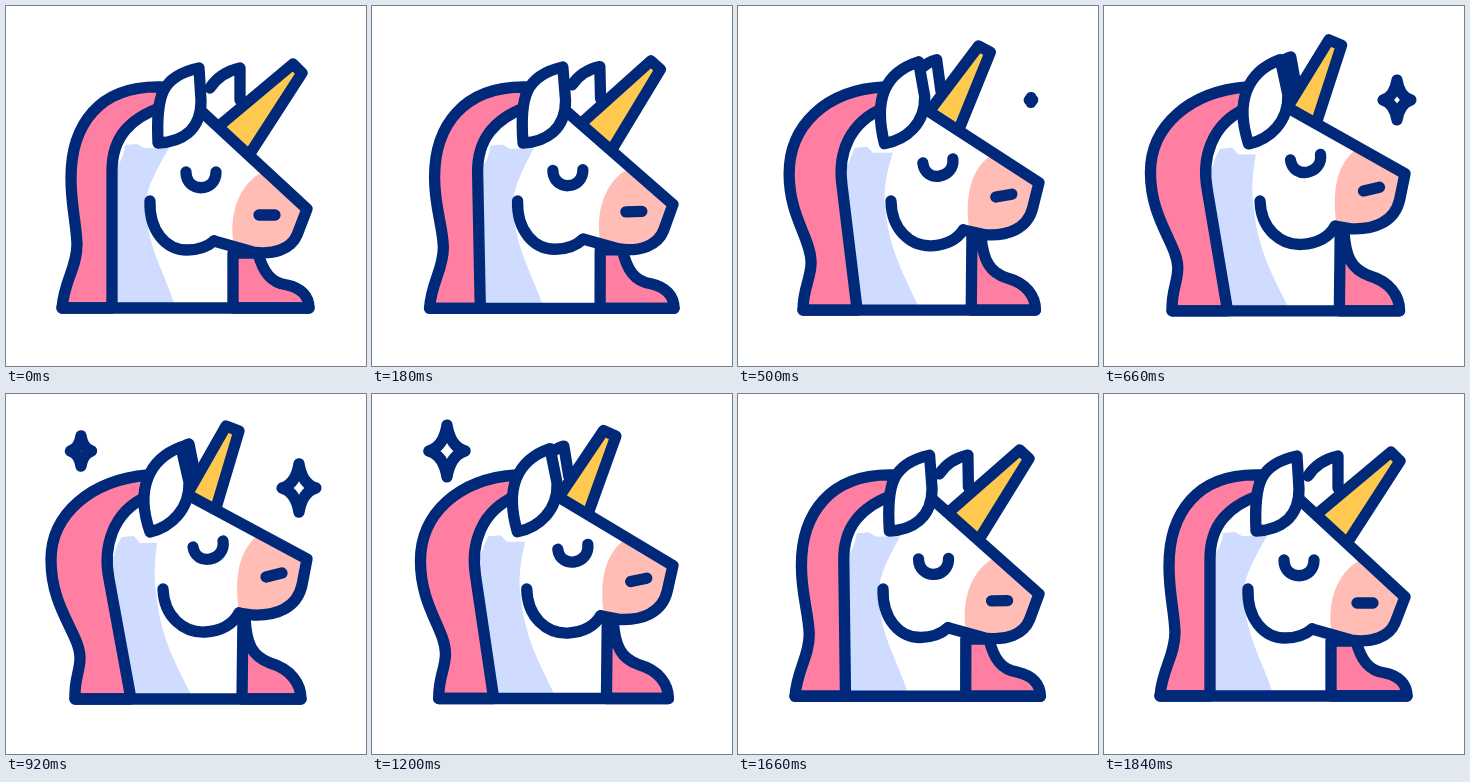
Write an HTML page that moves like this. It is 360 px wide and 360 px high and loops after 2.4 s.

```html
<!DOCTYPE html>
<html lang="en">
<head>
<meta charset="utf-8">
<title>Unicorn</title>
<style>
  html, body { margin: 0; height: 100%; overflow: hidden; background: #fff; }
  svg { display: block; width: 100vw; height: 100vh; }
  path { fill: none; stroke: #00297a; stroke-width: 11.3; stroke-linecap: round; stroke-linejoin: round; }
  .bare { stroke: none; }
</style>
</head>
<body>
<svg id="stage" viewBox="0 0 360 360"></svg>
<script>
const LOOP = 2400;
const stage = document.getElementById('stage');
const pink = '#ff7fa2', blush = '#ffbdb6', shade = '#d0dcff', gold = '#ffc94f';

function addPath(fill = 'none', className = '') {
  const path = document.createElementNS('http://www.w3.org/2000/svg', 'path');
  path.style.fill = fill;
  path.setAttribute('class', className);
  return stage.appendChild(path);
}

// Each part has a resting and a raised outline with matching points.
const parts = [
  { name: 'shade', fill: shade, bare: true,
    rest: 'M106 300 L106 166 C114 158 118 150 119 139 L131 138 L138 142 L163 142 C150 165 138 185 140 205 C143 245 158 265 169 300 Z',
    raised: 'M125 303 L103 175 C108 165 109 152 116 143 L128 142 L134 149 L151 149 C149 165 147 185 151 205 C155 245 172 275 186 302 Z' },
  { name: 'muzzle', fill: blush, bare: true,
    rest: 'M258 165 C232 178 222 210 228 241 L247 246 C268 249 285 243 291 229 L301 203 Z',
    raised: 'M254 140 C232 155 228 185 233 218 L247 221 C270 222 291 214 296 191 L301 165 Z' },
  { name: 'mane', fill: pink,
    rest: 'M56 302 C58 275 71 262 71 238 C70 215 65 200 65 172 C65 120 92 79 156 81 L156 101 C125 112 106 130 106 165 L106 302 Z',
    raised: 'M69 305 C68 285 74 278 74 264 C74 240 45 215 45 166 C45 120 85 86 142 81 L142 102 C105 118 97 155 103 185 L125 305 Z' },
  { name: 'lock', fill: pink,
    rest: 'M227 302 L227 247 L252 247 C257 266 265 277 281 279 C295 282 303 290 303 302 Z',
    raised: 'M236 305 L237 221 L239 222 C240 250 246 262 264 269 C285 275 295 290 295 305 Z' },
  { name: 'base',
    rest: 'M56 302 L303 302',
    raised: 'M69 305 L295 305' },
  { name: 'back ear', fill: '#fff',
    rest: 'M204 82 C211 71 221 65 234 62 L234 94',
    raised: 'M172 56 C176 53 179 51 183 50 L189 80' },
  { name: 'horn', fill: gold,
    rest: 'M213 120 L287 58 L296 67 L245 146',
    raised: 'M183 97 L220 32 L233 37 L210 114' },
  { name: 'head',
    rest: 'M195 105 L301 203 L291 229 C285 243 268 249 247 246 L208 235',
    raised: 'M182 101 L301 165 L296 191 C291 214 270 222 247 221 L233 219' },
  { name: 'cheek',
    rest: 'M144 195 C143 225 160 244 181 244 C193 244 201 241 208 235',
    raised: 'M157 195 C158 223 178 239 199 238 C215 237 227 230 233 219' },
  { name: 'front ear', fill: '#fff',
    rest: 'M152 137 C150 90 155 70 193 62 L195 95 C195 125 175 136 152 137 Z',
    raised: 'M144 138 C129 95 143 65 175 53 L183 88 C184 115 165 133 144 138 Z' },
  { name: 'eye',
    rest: 'M180 166 C180 187 210 187 210 166',
    raised: 'M187 153 C190 173 220 167 217 147' },
  { name: 'nostril',
    rest: 'M253 209 L269 209',
    raised: 'M260 183 L276 179' }
];
for (const part of parts) part.node = addPath(part.fill, part.bare ? 'bare' : '');

const sparkles = [
  { x: 293, y: 94, peak: 811 },
  { x: 75, y: 57, peak: 1110 }
].map(sparkle => ({ ...sparkle, node: addPath('#fff') }));

const clamp = value => Math.min(1, Math.max(0, value));
const ease = value => (1 - Math.cos(Math.PI * clamp(value))) / 2;

function mix(from, to, amount) {
  const ends = to.match(/\d+/g);
  let index = 0;
  return from.replace(/\d+/g, start => (+start + (ends[index++] - start) * amount).toFixed(2));
}

function sparklePath(x, y, size) {
  const point = (dx, dy) => `${x + dx * size} ${y + dy * size}`;
  return `M${point(0, -30)} Q${point(4, -5)} ${point(21, 0)} Q${point(4, 5)} ${point(0, 30)} ` +
    `Q${point(-4, 5)} ${point(-21, 0)} Q${point(-4, -5)} ${point(0, -30)} Z`;
}

function render(time) {
  const lift = time < 900 ? ease(time / 800) : ease((1815 - time) / 845);
  for (const part of parts) part.node.setAttribute('d', mix(part.rest, part.raised, lift));

  for (const { x, y, peak, node } of sparkles) {
    const size = ease(1 - Math.abs(time - peak) / 380);
    node.setAttribute('d', size > 0 ? sparklePath(x, y, size) : '');
  }
}

const begin = performance.now();
function tick() {
  render((performance.now() - begin) % LOOP);
  requestAnimationFrame(tick);
}
tick();
</script>
</body>
</html>
```
